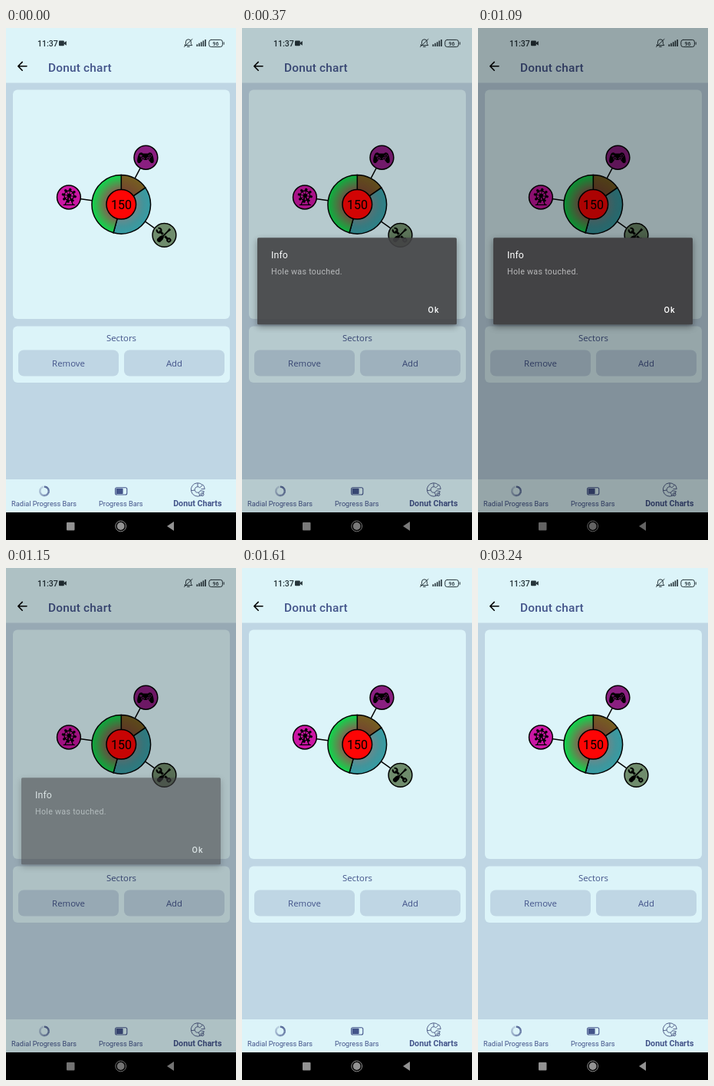
An HTML page for the animation above (3.27 s loop, 300 by 667 pixels).

```html
<!DOCTYPE html>
<html lang="en">
<head>
<meta charset="utf-8">
<title>Donut chart</title>
<style>
  html, body { margin: 0; width: 100%; height: 100%; overflow: hidden; background: #bfd6e4; }
  svg { display: block; width: 300px; height: 667px; font-family: Roboto, sans-serif; }
  .open { font-family: "Open Sans", "Noto Sans", sans-serif; font-size: 11.4px; text-anchor: middle; }
  .ink { fill: #43548a; }
  .mid { text-anchor: middle; }
  .light { fill: #dcf4f9; }
  .tint { fill: #bfd6e4; }
  .line { fill: none; stroke: #000; stroke-linecap: round; stroke-linejoin: round; }
  #dim, #dialog { opacity: 0; }
  #dialog rect { filter: drop-shadow(0 3px 4px rgba(0, 0, 0, .4)); }
</style>
</head>
<body>
<svg viewBox="0 0 300 667">
  <defs>
    <radialGradient id="brown" gradientUnits="userSpaceOnUse" cx="150.3" cy="229.8" r="38.5">
      <stop offset=".5" stop-color="#74462f"/><stop offset="1" stop-color="#756020"/>
    </radialGradient>
    <radialGradient id="teal" gradientUnits="userSpaceOnUse" cx="150.3" cy="229.8" r="38.5">
      <stop offset=".5" stop-color="#668a8d"/><stop offset=".75" stop-color="#43949a"/><stop offset="1" stop-color="#349da5"/>
    </radialGradient>
    <radialGradient id="green" gradientUnits="userSpaceOnUse" cx="150.3" cy="229.8" r="38.5">
      <stop offset=".5" stop-color="#806451"/><stop offset=".75" stop-color="#47a04e"/><stop offset="1" stop-color="#08dc4c"/>
    </radialGradient>
  </defs>

  <rect class="tint" width="300" height="667"/>
  <rect class="light" width="300" height="71.5"/>
  <rect class="light" x="9" y="80.5" width="283" height="298.5" rx="6"/>
  <rect class="light" x="9" y="388.5" width="283" height="73.5" rx="6"/>
  <rect class="tint" x="16" y="419.5" width="131" height="34" rx="7"/>
  <rect class="tint" x="154" y="419.5" width="131" height="34" rx="7"/>
  <rect class="light" y="588" width="300" height="43"/>
  <rect y="631" width="300" height="36"/>

  <!-- status bar -->
  <g fill="#26343a">
    <text x="41" y="23.8" font-size="10.6" font-weight="500">11:37</text>
    <rect x="69" y="16.6" width="6.8" height="6.6" rx="1"/>
    <path d="M75.5 19.3l3.3-2.3v5.8l-3.3-2.3z"/>
    <path d="M248.5 21.2h1.6v2.8h-1.6zM251.2 19.7h1.6V24h-1.6zM253.9 18.2h1.6V24h-1.6zM256.6 16.6h1.6V24h-1.6zM259.3 15h1.6v9h-1.6z"/>
    <text class="mid" x="273.6" y="22.5" font-size="7" font-weight="500">96</text>
  </g>
  <g fill="none" stroke="#26343a" stroke-linecap="round">
    <path d="M233.2 22.3l1.3-1.8v-2.3a3.4 3.4 0 0 1 6.8 0v2.3l1.3 1.8zM236.6 24.4h2.6M232.5 24.5l10.5-10"/>
    <rect x="264.8" y="15.4" width="17.6" height="9.2" rx="2.8"/>
    <path d="M284.2 18.7v2.6"/>
  </g>

  <!-- header -->
  <path class="line" stroke-width="1.6" stroke-linecap="butt" d="M27 49.8H16M21.2 44.4l-5.4 5.4 5.4 5.4"/>
  <text class="ink" x="55" y="56.6" font-size="15.4" font-weight="500" letter-spacing=".2">Donut chart</text>

  <g id="chart" stroke="#000" stroke-width="1.5"></g>
  <text class="mid" x="150.4" y="235.7" font-size="16">150</text>

  <!-- gamepad -->
  <g transform="translate(182 169)">
    <path d="M-7.5-6.3Q-5-7.4-3.2-5.4H3.2Q5-7.4 7.5-6.3C9.6-4.6 11 1.5 10.8 4.6C10.5 8 7.4 7.6 5.8 5.2L4 2.9H-4L-5.8 5.2C-7.4 7.6-10.5 8-10.8 4.6C-11 1.5-9.6-4.6-7.5-6.3Z"/>
    <g fill="none" stroke="#8a1f80" stroke-width=".9">
      <path d="M-6-4.2v3.6M-7.8-2.4h3.6"/>
      <circle cx="-3.4" cy="1.2" r="1.6"/><circle cx="3.4" cy="1.2" r="1.6"/>
    </g>
    <g fill="#8a1f80"><circle cx="6" cy="-4.1" r=".7"/><circle cx="6" cy="-.8" r=".7"/><circle cx="4.4" cy="-2.4" r=".7"/><circle cx="7.6" cy="-2.4" r=".7"/></g>
  </g>

  <!-- wrench and screwdriver -->
  <g transform="translate(206 270)" stroke-linecap="round">
    <g transform="rotate(-45)">
      <path d="M0-7V7" stroke="#000" stroke-width="2.9"/>
      <path class="line" stroke-width="2.2" d="M-1.9-11.2a2.9 2.9 0 1 0 3.8 0"/>
      <circle class="line" stroke-width="2" cy="9" r="2.1"/>
    </g>
    <g transform="rotate(45)">
      <path d="M0-11V3" stroke="#6f8c6c" stroke-width="3.4"/>
      <path d="M0-9V2" stroke="#000" stroke-width="1.8"/>
      <path d="M-1.6-11.5h3.2l-.6 4h-2zM-1.5 1.5h3L2.9 4.5V10q-2.9 3.4-5.8 0V4.5z"/>
    </g>
  </g>

  <g id="wheel" class="line" transform="translate(82.3 218.3)" stroke-width="1.3">
    <circle r="6.3"/><circle r="2" fill="#000"/>
    <path d="M0 0L-5 11.5M0 0L5 11.5M-7 12H7"/>
  </g>

  <!-- sector controls -->
  <g class="open ink">
    <text x="150.5" y="408.3">Sectors</text>
    <text x="81.5" y="440.5">Remove</text>
    <text x="219.5" y="440.5">Add</text>
  </g>

  <!-- tabs -->
  <g id="spinner" fill="none" stroke="#43548a" stroke-width="2.4" transform="translate(50 603.3)"></g>
  <rect x="142.6" y="598.8" width="15.2" height="9.2" rx="2" fill="none" stroke="#43548a" stroke-width="1.1"/>
  <rect x="143.6" y="599.8" width="9" height="7.2" rx=".8" fill="#43548a"/>
  <g fill="none" stroke="#53618a" stroke-width="1">
    <path d="M256.3 595.4A8.7 8.7 0 1 0 258.4 603.8L253.6 602.6A3.8 3.8 0 1 1 252.8 598.9Z"/>
    <path d="M250 592.8V597.4M241.4 602.8L246.2 602M253 609.8L251.4 605.2M254.5 600.6H259.2A9 9 0 0 0 256.5 594.6"/>
    <circle cx="256" cy="607.6" r="2"/>
  </g>
  <g class="ink mid">
    <text x="49.6" y="622.8" font-size="9.2">Radial Progress Bars</text>
    <text x="149.8" y="622.8" font-size="9.2">Progress Bars</text>
    <text x="249.8" y="622.8" font-size="10.7" font-weight="700">Donut Charts</text>
  </g>

  <!-- system navigation -->
  <g fill="#929292">
    <rect x="79" y="644" width="10.5" height="10.5" rx="1"/>
    <circle cx="149.7" cy="649" r="4.9"/>
    <circle cx="149.7" cy="649" r="6.9" fill="none" stroke="#929292" stroke-width="1"/>
    <path d="M210 649l9-6v12z"/>
  </g>

  <rect id="dim" width="300" height="667"/>
  <g id="dialog">
    <rect x="20" y="273.3" width="260" height="113" rx="1.5" fill="#434345"/>
    <text x="38" y="300.2" font-size="12.3" letter-spacing=".12" fill="#fff">Info</text>
    <text x="38" y="321.4" font-size="10.7" letter-spacing=".28" fill="#b9b9ba">Hole was touched.</text>
    <text x="242.6" y="370.6" font-size="10.7" font-weight="500" letter-spacing=".95" fill="#fff">Ok</text>
  </g>
</svg>
<script>
const LOOP = 3270;
const CX = 150.3, CY = 229.8, OUTER = 38.3, HOLE = 19.3, REACH = 69;
const $ = id => document.getElementById(id);

function add(parent, tag, attrs) {
  const el = document.createElementNS('http://www.w3.org/2000/svg', tag);
  for (const key in attrs) el.setAttribute(key, attrs[key]);
  parent.append(el);
}

// Degrees run clockwise from the top.
function polar(r, deg, x = 0, y = 0) {
  const a = deg * Math.PI / 180;
  return [x + r * Math.sin(a), y - r * Math.cos(a)];
}
const onChart = (r, deg) => polar(r, deg, CX, CY);

const sectors = [
  { from: 0, to: 55.5, fill: 'url(#brown)', badge: '#8a1f80' },
  { from: 55.5, to: 195.5, fill: 'url(#teal)', badge: '#6f8c6c' },
  { from: 195.5, to: 360, fill: 'url(#green)', badge: '#cc16a4' }
];
for (const { from, to, fill, badge } of sectors) {
  const middle = (from + to) / 2;
  const [cx, cy] = onChart(REACH, middle);
  add($('chart'), 'path', { d: `M${onChart(OUTER, middle)}L${cx} ${cy}` });
  add($('chart'), 'circle', { cx, cy, r: 15.4, fill: badge });
  add($('chart'), 'path', {
    d: `M${CX} ${CY}L${onChart(OUTER, from)}A${OUTER} ${OUTER} 0 0 1 ${onChart(OUTER, to)}Z`, fill
  });
}
add($('chart'), 'circle', { cx: CX, cy: CY, r: HOLE, fill: '#fd0505' });

for (let i = 0; i < 8; i++) {
  const [cx, cy] = polar(8, i * 45 + 10);
  add($('wheel'), 'path', { d: `M0 0L${cx} ${cy}`, 'stroke-width': 0.9 });
  add($('wheel'), 'circle', { cx, cy, r: 1.4, fill: '#000', 'stroke-width': 0.6 });
}

// Ring that fades along its length.
for (let i = 0; i < 24; i++) {
  add($('spinner'), 'path', {
    d: `M${polar(5.7, i * 15)}A5.7 5.7 0 0 1 ${polar(5.7, i * 15 + 15.5)}`,
    opacity: i < 13 ? 0.95 - i * 0.03 : 0.5 - (i - 13) * 0.035
  });
}

function fade(id, steps) {
  const frames = steps.map(([ms, opacity]) => ({ offset: ms / LOOP, opacity }));
  $(id).animate(frames, { duration: LOOP, iterations: Infinity });
}
fade('dim', [[0, 0], [270, 0], [370, .17], [460, .32], [1105, .32], [1210, .075], [1245, 0], [LOOP, 0]]);
fade('dialog', [[0, 0], [250, 0], [310, .6], [370, .9], [410, 1], [1105, 1], [1205, .02], [1240, 0], [LOOP, 0]]);
</script>
</body>
</html>
```
